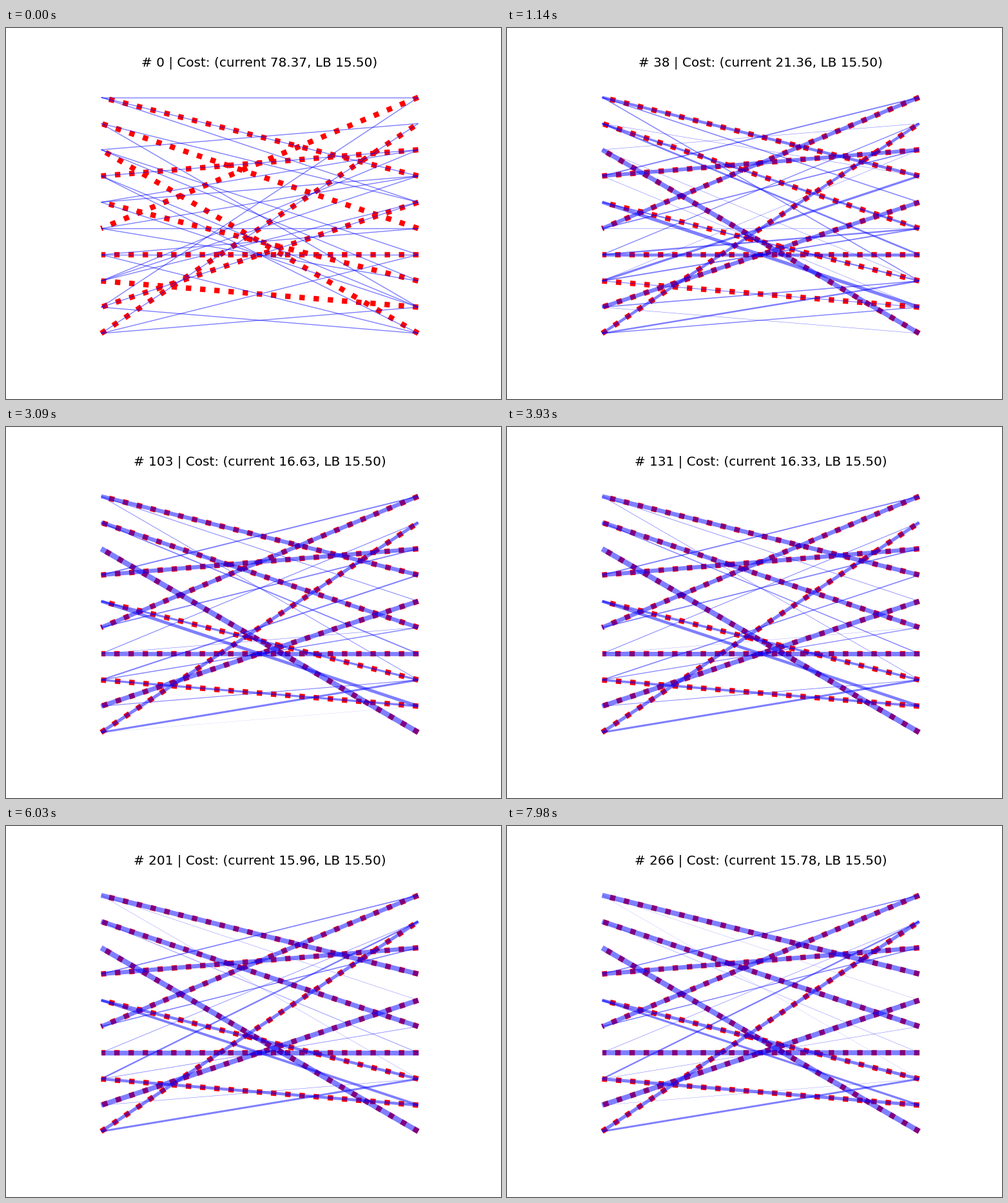
Animation, 768 px wide and 576 px high, one loop 8000 ms. Source, as a matplotlib script:

```python
import numpy as np
import matplotlib.pyplot as plt
from matplotlib.animation import FuncAnimation
from matplotlib.collections import LineCollection

DPI = 120
STEP, TICK, LOOP = 30, 20, 8000      # ms per iteration, per frame, per loop
FULL = 8.33                          # line width in px of a full assignment
THIN = 1.4                           # line width in px of a starting edge
N = 10

# right node assigned to each left node
MATCH = [3, 5, 9, 2, 7, 0, 6, 8, 4, 1]

# right nodes joined to each left node at the start
START = [[0, 3, 4], [4, 8], [1, 6, 7], [2, 8, 9], [2, 3, 8],
         [3, 5, 7], [5, 6, 9], [2, 3, 4], [0, 4, 9], [1, 6, 8]]

# edges tried only for a short while
BRIEF = [(1, 3), (2, 1), (2, 7), (3, 8), (5, 5), (7, 2), (8, 9)]

# competing edges: left, right, peak width, decay time, first and last iteration
RIVALS = [
    (0, 4, 2.2, 130), (0, 7, 2.2, 115), (1, 6, 4, 125), (3, 0, 2.2, 800),
    (4, 8, 6.2, 420), (5, 2, 2, 1000), (6, 1, 1.6, 280), (6, 5, 6, 45),
    (7, 3, 5, 115, 0, 170), (7, 1, 2.8, 1500, 140), (7, 5, 2.6, 170),
    (8, 7, 2.2, 150), (9, 7, 3.2, 3000, 15), (9, 8, 6, 28),
] + [(i, j, 4, 20) for i, j in BRIEF]

BOUND = 15.50
COST_KEYS = np.array([0, 19, 59, 103, 131, 201, 266])
COSTS = np.array([78.37, 30.58, 18.15, 16.63, 16.33, 15.96, 15.78])


def cost(n):
    gap = np.log(COSTS - BOUND)
    return BOUND + np.exp(np.interp(np.sqrt(n), np.sqrt(COST_KEYS), gap))


def rise(n, time):
    return 1 - np.exp(-max(n, 0) / time)


def rival_width(n, peak, decay, first=0, last=LOOP):
    return peak * rise(n - first, 15) * np.exp(-n / decay) * (n < last)


def widths(n):
    """Width in points of every left-right edge at iteration n."""
    grid = np.zeros((N, N))
    for i, j, *params in RIVALS:
        grid[i, j] = rival_width(n, *params)
    # an assigned edge takes what its rivals leave over
    used = np.maximum(grid.sum(axis=1), grid.sum(axis=0)[MATCH])
    grid[range(N), MATCH] = np.maximum(FULL - used, 0) * rise(n, 8)
    for i, ends in enumerate(START):
        grid[i, ends] += THIN * np.exp(-n / 7)
    return np.where(grid < 0.1, 0, grid).ravel() * 72 / DPI


def segment(i, j):
    return [(1, j / (N - 1)), (0, i / (N - 1))]


fig, ax = plt.subplots(figsize=(6.4, 4.8), dpi=DPI)
ax.set_xlim(-0.105, 1.105)
ax.set_ylim(1.105, -0.105)
ax.axis("off")
title = ax.set_title("", fontsize=12)

for i, j in enumerate(MATCH):
    # dashes run from the right, on the last edge from the left
    order = -1 if i == N - 1 else 1
    xs, ys = zip(*segment(i, j)[::order])
    ax.plot(xs, ys, ":", color="red", lw=5, zorder=1)

lines = LineCollection([segment(i, j) for i in range(N) for j in range(N)],
                       colors="blue", alpha=0.5, zorder=2)
ax.add_collection(lines, autolim=False)


def update(frame):
    n = (frame * TICK + TICK // 2) // STEP
    lines.set_linewidths(widths(n))
    title.set_text(f"# {n} | Cost: (current {cost(n):.2f}, LB {BOUND:.2f})")
    return lines, title


anim = FuncAnimation(fig, update, frames=LOOP // TICK, interval=TICK,
                     init_func=lambda: update(0), repeat=True, repeat_delay=0)
plt.show()
```
